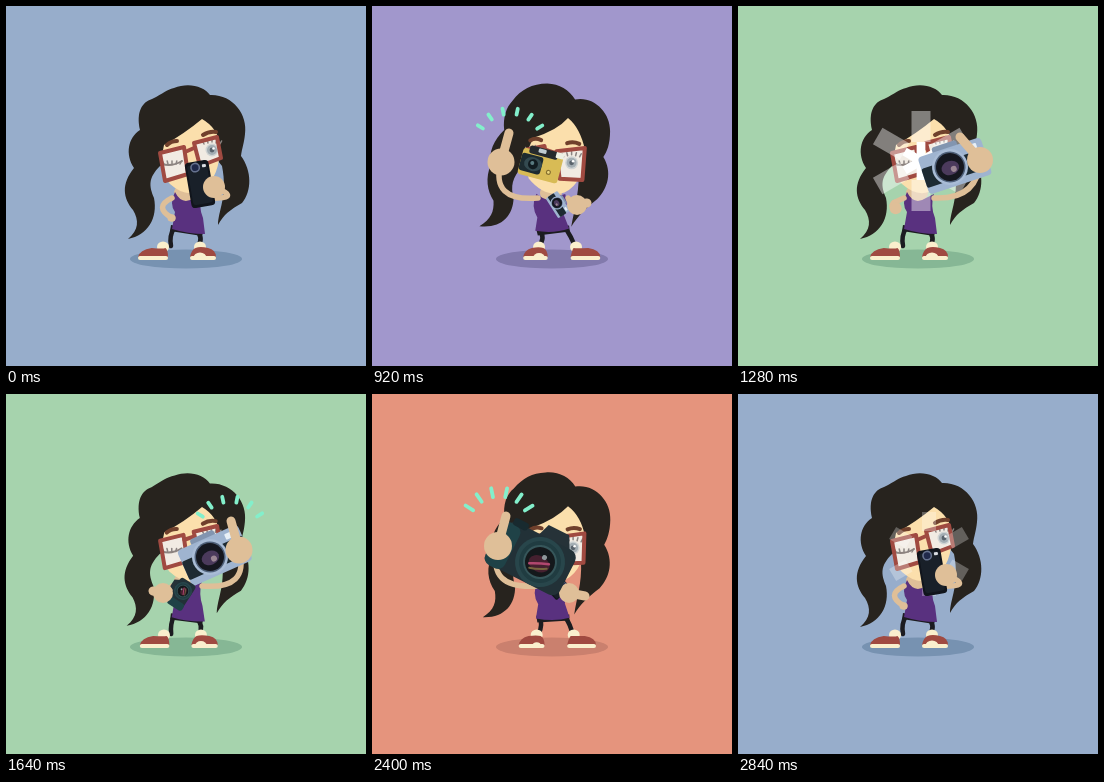
Recreate the animation shown at these times as an HTML page with a canvas. Size 360 px wide and 360 px high, loop 2.88 s.

```html
<!DOCTYPE html>
<html lang="en">
<head>
<meta charset="utf-8">
<title>Camera juggling</title>
<style>
html, body { margin: 0; width: 100%; height: 100%; overflow: hidden; background: #97adcb; }
canvas { display: block; width: 100vmin; height: 100vmin; margin: auto; }
</style>
</head>
<body>
<canvas width="360" height="360"></canvas>
<script>
const canvas = document.querySelector('canvas');
const ctx = canvas.getContext('2d');
const density = Math.max(1, Math.min(3, devicePixelRatio || 1));
canvas.width = canvas.height = 360 * density;

const LOOP = 2880, MIRROR = 362;
const HAIR = '#27231e', SKIN = '#fbdfac', HAND = '#dfbf98', RED = '#a04a41',
  CREAM = '#faefcd', PURPLE = '#59317f', INK = '#1c1c20', MINT = '#83efcb';

const mod = (n, m) => ((n % m) + m) % m;
const mix = (a, b, k) => a + (b - a) * k;
const smooth = k => { k = Math.max(0, Math.min(1, k)); return k * k * (3 - 2 * k); };

// Rows are [time, ...values]; returns the values at t.
function keyed(rows, t) {
  if (t <= rows[0][0]) return rows[0].slice(1);
  const i = rows.findIndex(row => row[0] > t);
  if (i < 0) return rows[rows.length - 1].slice(1);
  const [a, b] = [rows[i - 1], rows[i]], k = (t - a[0]) / (b[0] - a[0]);
  return a.slice(1).map((v, j) => mix(v, b[j + 1], k));
}

// Blends two path strings that share the same commands.
function morph(a, b, k) {
  const target = b.match(/[\d.]+/g);
  let i = 0;
  return a.replace(/[\d.]+/g, n => mix(+n, +target[i++], k).toFixed(2));
}

function fill(d, color) {
  ctx.fillStyle = color;
  ctx.fill(new Path2D(d));
}
function stroke(d, color, width) {
  ctx.strokeStyle = color;
  ctx.lineWidth = width;
  ctx.stroke(new Path2D(d));
}
function oval(x, y, rx, color, ry = rx, from = 0) {
  ctx.fillStyle = color;
  ctx.beginPath();
  ctx.ellipse(x, y, rx, ry, 0, from, Math.PI * 2);
  ctx.fill();
}
function box(x, y, w, h, r, color) {
  ctx.fillStyle = color;
  ctx.beginPath();
  ctx.roundRect(x, y, w, h, r);
  ctx.fill();
}

// backdrop rgb, shadow rgb
const BLUE = [151, 173, 203, 119, 146, 177], VIOLET = [161, 151, 204, 130, 122, 172],
  GREEN = [166, 211, 173, 134, 183, 149], YELLOW = [221, 210, 132, 192, 161, 108],
  SALMON = [229, 148, 125, 202, 128, 110];
const backdrop = [
  [0, ...BLUE], [440, ...BLUE], [560, ...VIOLET], [1160, ...VIOLET], [1260, ...GREEN],
  [1840, ...GREEN], [1920, ...YELLOW], [2000, ...SALMON], [2600, ...SALMON], [2700, ...BLUE]
];

function phone() {
  box(-12, -23, 24, 46, 4, '#11151c');
  box(-10, -20, 20, 40, 3, '#192029');
  oval(-2, -17, 5, '#66728e');
  oval(-2, -17, 3.4, '#20294a');
  box(5, -19, 4, 3, 1, '#d9dde2');
}
function compact() {
  box(-20, -13, 41, 27, 3, '#d8bb55');
  box(-20, -8, 22, 18, 3, '#1d2b30');
  box(-14, -17, 29, 8, 2, '#252a2d');
  box(-5, -16, 8, 4, 1, '#bfccd0');
  box(13, -17, 8, 6, 1, '#eef0e4');
  oval(-7, 1, 9, '#344a50', 7);
  oval(-7, 1, 5, '#111b20');
  oval(-8, 0, 2, '#597a80');
  oval(10, 5, 2.5, '#86702f');
  oval(10, 5, 1.4, '#eed97f');
}
function rangefinder() {
  box(-12, -24, 26, 10, 3, '#8295b0');
  box(-28, -19, 66, 39, 4, '#9fb4d0');
  box(-28, -7, 66, 20, 2, '#1d2a32');
  box(22, -15, 10, 6, 1, '#e8f0f7');
  oval(0, 0, 18, '#a9bcd6');
  oval(0, 0, 15.5, '#4f6079');
  oval(0, 0, 14, '#15171f');
  oval(0, 1, 9, '#4b3a5c', 7);
  oval(3, 3, 3, '#9c8794');
}
function reflex() {
  fill('M-14 -22 L-9 -37 L14 -37 L22 -22Z', '#263238');
  box(-46, -25, 77, 50, 9, '#223137');
  box(-52, -22, 22, 48, 8, '#1f4247');
  box(-42, -29, 16, 8, 3, '#182a2f');
  oval(0, 0, 25, '#28464b');
  oval(0, 0, 21, '#203c41');
  oval(0, 0, 17, '#36565a');
  oval(0, 0, 15, '#14181b');
  oval(0, 2, 11, '#45202f', 8);
  stroke('M-9 6 Q0 1 9 -2', '#b0476f', 2.5);
  stroke('M-7 10 Q1 8 9 3', '#75653f', 2);
  oval(2, -6, 2.5, '#8d969a');
}

// side: 1 is held by the hand at the left of the stage, -1 by the other one
const cameras = [
  { draw: phone, side: -1, flashAt: 2680, x: 194, y: 178, angle: -.17, flash: [191, 160], grip: [154, 181, 11, 155, 178], haste: 1.4 },
  { draw: compact, side: 1, flashAt: 520, x: 160, y: 157, angle: .16, flash: [163, 152], grip: [123, 160, 14, 133, 133], haste: 1 },
  { draw: rangefinder, side: -1, flashAt: 1240, x: 212, y: 161, angle: -.32, flash: [183, 155], grip: [120, 154, 13, 140, 131], haste: 1 },
  { draw: reflex, side: 1, flashAt: 1960, x: 157, y: 161, angle: .2, flash: [160, 150], grip: [112, 150, 14, 123, 126], haste: 1 }
];

// Hand and camera tracks are written for the left side and mirrored for the other.
function handAt(camera, w) {
  const hold = [...camera.grip, 122, 194];
  const hip = [166, 212, 3.5, 165, 212, 147, 201];
  const pull = [157, 199, 10, 147, 197, 160, 205];
  return keyed([
    [-340, 158, 201, 9, 149, 199, 158, 205], [-320, ...pull],
    [-280, 165, 199, 10, 149, 202, 166, 205], [-120, 118, 166, 13, 122, 148, 122, 200],
    [-40, ...hold], [240, ...hold],
    [400, 129, 156, 13.5, 137, 127, 118, 196], [440, 126, 152, 14, 134, 122, 114, 196],
    [540, 108, 142, 13, 101, 125, 120, 196], [680, 141, 183, 11, 141, 170, 148, 197],
    [800, ...hip], [1020, ...hip], [1100, 158, 201, 9, 149, 199, 158, 205]
  ], w);
}
function cameraAt(c, w) {
  const x = c.side > 0 ? c.x : MIRROR - c.x, a = c.angle * c.side, y = c.y;
  return keyed([
    [-340, 177, 203, .25, -1.1], [-320, 177, 197, .36, -1], [-280, 174, 196, .42, -.8],
    [-120, x - 5, y + 5, .95, a - .1], [-40, x, y, 1, a], [240, x, y, 1, a],
    [400, x + 8, y + 2, 1, a + .1], [440, x + 11, y + 7, 1, a + .27],
    [540, 118, 122, 1, .1], [680, 35, 12, 1, -.5], [780, -55, -60, 1, -.9]
  ], w);
}

function mirrored(side, draw) {
  ctx.save();
  if (side < 0) {
    ctx.translate(MIRROR, 0);
    ctx.scale(-1, 1);
  }
  draw();
  ctx.restore();
}

function arm([x, y, , , , cx, cy]) {
  stroke(`M166 192 Q${cx} ${cy} ${x} ${y}`, HAND, 5.5);
}
function hand([x, y, r, tipX, tipY]) {
  stroke(`M${x} ${y} L${tipX} ${tipY}`, HAND, Math.min(9, r * 2));
  oval(x, y, r, HAND);
}
function clickRays(w) {
  if (w < 340 || w > 500) return;
  const [length, x, y] = keyed([[340, 0, 142, 139], [400, 6, 138, 139], [440, 9, 127, 132], [500, 0, 120, 128]], w);
  for (let i = 0; i < 6; i++) {
    const a = -2.58 + i * .405, cx = x + Math.cos(a) * 35, cy = y + Math.sin(a) * 34;
    const dx = Math.cos(a) * length / 2, dy = Math.sin(a) * length / 2;
    stroke(`M${cx - dx} ${cy - dy} L${cx + dx} ${cy + dy}`, MINT, 3.8);
  }
}

function flash([x, y], w) {
  if (w <= 0 || w >= 200) return;
  const [outer, inner, core, alpha, width] = keyed([
    [0, 0, 0, 0, .4, 19], [40, 50, 0, 19, .42, 19], [80, 112, 0, 40, .6, 19],
    [120, 76, 16, 16, .5, 17], [160, 42, 23, 23, .28, 14], [200, 42, 42, 42, 0, 10]
  ], w);
  ctx.save();
  ctx.translate(x, y);
  for (let i = 0; i < 6; i++) {
    ctx.rotate(Math.PI / 3);
    ctx.fillStyle = `rgba(255,255,255,${alpha})`;
    ctx.fillRect(-width / 2, -outer, width, outer - Math.max(inner, core));
    ctx.fillStyle = '#fff';
    ctx.fillRect(-width * .23, -core, width * .46, core - inner);
  }
  ctx.restore();
}

// front: 0 is seen from the side, 1 is seen from the front
function shoe(x0, x1, cuff, front) {
  const w = x1 - x0;
  oval(cuff, 241, 6, CREAM, 5.5);
  fill(`M${x0} 251 Q${x0 + w * .05} 244 ${mix(x0, cuff, .55)} 242 Q${cuff} ${243 - front * 3} ${mix(x1, cuff, .5)} 242 Q${x1} 244 ${x1} 251Z`, RED);
  box(x0, 250, w, 4, 2, CREAM);
  oval(cuff, 252, 6.5 * front, CREAM, 5.5 * front, Math.PI);
}

function eye(x, y, open) {
  if (open > .5) {
    oval(x, y, 6.5, '#cfd3d3');
    oval(x, y, 5, '#a3adb3');
    oval(x, y, 2.4, '#59636c');
    oval(x + 1.5, y - 1.5, 1.3, '#fff');
  } else {
    stroke(`M${x - 10} ${y + 2} Q${x} ${y + 5} ${x + 10} ${y - 1}`, '#8c827e', 2);
  }
  for (let i = -2; i <= 2; i++) {
    const base = open > .5 ? y - 8 + Math.abs(i) : y + 2;
    stroke(`M${x + i * 4} ${base} l${i * .8} -3`, '#8b8482', 1.5);
  }
}

function character(p) {
  const shape = (a, b) => morph(a, b, p);
  fill(shape(
    'M146 93 C158 87 160 84 168 82 C182 76 198 80 204 89 C226 88 242 108 239 128 C238 138 236 142 235 150 C246 165 246 185 236 197 C224 204 218 208 212 219 C212 205 222 190 216 160 L200 140 L154 160 C142 172 143 180 148 192 C152 212 142 229 122 233 C133 224 133 214 127 204 C117 192 115 178 128 162 C119 148 122 132 134 124 C130 106 136 96 146 93Z',
    'M140 95 C148 83 160 77 176 77 C188 78 197 84 203 94 C221 90 238 106 238 125 C238 138 235 146 231 151 C240 166 235 182 224 193 C212 203 205 210 198 221 C201 205 205 190 206 170 L200 140 L150 160 C140 172 138 180 141 192 C140 210 128 222 106 219 C118 212 121 205 121 194 C115 184 113 172 118 158 C116 146 122 134 132 124 C131 112 134 102 140 95Z'
  ), HAIR);

  stroke(shape('M168 222 Q163 230 165 240', 'M167 223 Q175 232 167 240'), INK, 4.5);
  stroke(shape('M190 224 Q198 232 192 240', 'M194 222 Q199 230 204 240'), INK, 4.5);
  fill(shape('M165 219 L198 224 L196 230 L164 225Z', 'M164 223 L197 219 L198 225 L166 230Z'), INK);
  shoe(mix(132, 153, p), mix(162, 177, p), mix(157, 168, p), p);
  shoe(mix(184, 200, p), mix(210, 230, p), mix(194, 205, p), 1 - p);

  oval(179, 187, 11, HAND, 9);
  fill(shape(
    'M169 186 Q176 200 188 192 L196 188 Q192 200 197 212 L199 228 Q182 228 166 223 L169 206 Q163 198 169 186Z',
    'M164 188 Q176 198 185 190 L193 188 Q197 200 191 208 L197 222 Q182 228 163 225 L165 212 Q158 200 164 188Z'
  ), PURPLE);

  fill(shape(
    'M196 113 Q178 128 158 139 Q152 165 164 178 Q182 194 198 182 Q214 170 214 140 Q212 122 196 113Z',
    'M196 112 Q186 124 162 131 Q150 150 156 172 Q172 192 192 187 Q212 178 213 145 Q208 122 196 112Z'
  ), SKIN);
  stroke(shape('M161 139 Q165 135 171 135', 'M158 134 Q163 131 169 134'), '#70402c', 4);
  stroke(shape('M197 129 Q203 125 210 126', 'M195 138 Q201 136 207 139'), '#70402c', 4);

  const left = shape('M154 147 L178 141 L182 168 L159 175Z', 'M155 143 L172 140 L175 162 L157 165Z');
  const right = shape('M188 137 L211 131 L215 152 L194 160Z', 'M184 146 L213 143 L210 176 L187 174Z');
  fill(left, '#f1ebe3');
  fill(right, '#f1ebe3');
  eye(mix(166, 163, p), mix(156, 150, p), p);
  eye(mix(206, 199, p), mix(144, 158, p), 1);
  stroke(left, RED, 4);
  stroke(right, RED, 4);
  stroke(shape('M179 146 L188 142', 'M172 143 L184 148'), RED, 4);
}

function render(now) {
  const t = Math.floor(mod(now, LOOP) / 40) * 40;
  ctx.setTransform(density, 0, 0, density, 0, 0);
  ctx.lineCap = ctx.lineJoin = 'round';

  const colors = keyed(backdrop, t).map(Math.round);
  ctx.fillStyle = `rgb(${colors.slice(0, 3)})`;
  ctx.fillRect(0, 0, 360, 360);
  oval(180, 253, 56, `rgb(${colors.slice(3)})`, 9.5);

  const half = t % 1440;
  character(smooth((half - 160) / 220) - smooth((half - 880) / 220));

  const active = cameras.map(camera => {
    const w = mod(t - camera.flashAt + 340, LOOP) - 340;
    const hurried = Math.max(w, Math.min(440 + (w - 440) * camera.haste, 800));
    const time = w > 440 ? hurried : w;
    return { camera, w, time, pose: handAt(camera, time) };
  }).filter(item => item.w < 1100);

  for (const { camera, w } of active) flash(camera.flash, w);
  for (const { camera, pose } of active) mirrored(camera.side, () => arm(pose));
  for (const { camera, w, time, pose } of active) {
    if (time < 780) {
      const [x, y, scale, angle] = cameraAt(camera, time);
      ctx.save();
      ctx.translate(camera.side > 0 ? x : MIRROR - x, y);
      ctx.rotate(angle * camera.side);
      ctx.scale(scale, scale);
      camera.draw();
      ctx.restore();
    }
    mirrored(camera.side, () => {
      hand(pose);
      clickRays(w);
    });
  }
}

const start = performance.now();
function tick() {
  render(performance.now() - start);
  requestAnimationFrame(tick);
}
tick();
</script>
</body>
</html>
```
